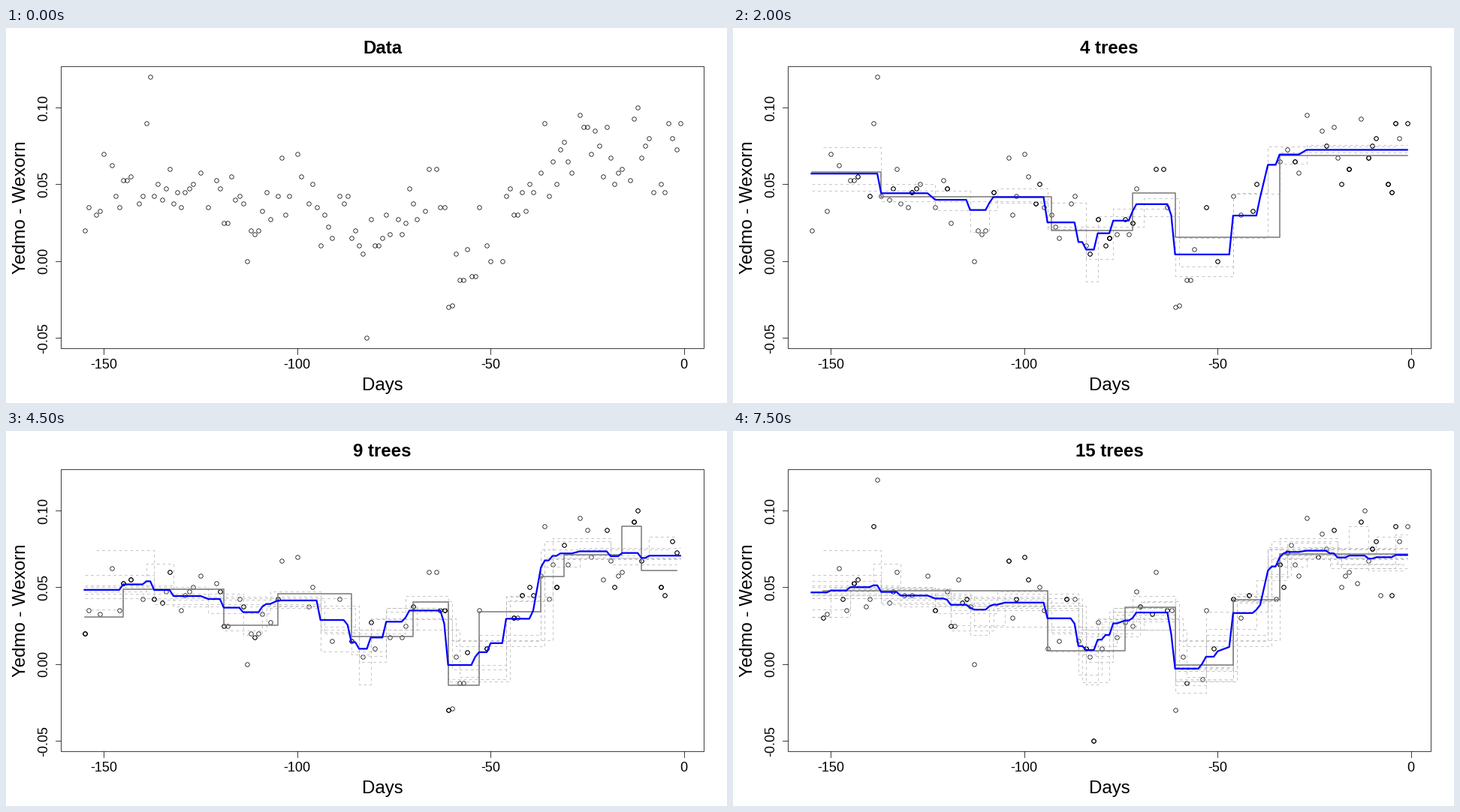
A matplotlib script for the animation above (8 s loop, 960 px wide and 500 px high).

```python
import matplotlib.pyplot as plt
import numpy as np
from matplotlib.animation import FuncAnimation
from matplotlib.patches import Rectangle

PT = 0.72   # points per pixel at 100 dpi
THIN = 0.75
TREES = 15
plt.rcParams["font.family"] = "Liberation Sans"

# Margins are in thousandths. Each phase: first day, mean, half-width of scatter.
PHASES = [(-155, 44, 25), (-142, 64, 12), (-135, 46, 24), (-120, 30, 26),
          (-109, 46, 27), (-98, 32, 22), (-86, 0, 10), (-81, 20, 11),
          (-71, 42, 18), (-61, -4, 14), (-49, 33, 20), (-40, 51, 7),
          (-36, 65, 22), (-28, 74, 22), (-10, 70, 22)]
# Polls that stand out.
KEY = {-155: 20, -150: 70, -139: 90, -138: 120, -113: 0, -100: 70, -82: -50,
       -66: 60, -61: -30, -60: -29, -53: 35, -47: 0, -36: 90, -27: 95,
       -12: 100, -8: 45, -4: 90, -1: 90}


def make_polls(seed):
    """Scatter polls around each phase mean, with some days left empty."""
    rng = np.random.default_rng(seed)
    polls = dict(KEY)
    ends = [p[0] for p in PHASES[1:]] + [0]
    for (start, mean, spread), end in zip(PHASES, ends):
        days = [d for d in range(start, end) if d in KEY or rng.random() < 0.85]
        free = [d for d in days if d not in KEY]
        fixed = sum(KEY[d] for d in days if d in KEY)
        noise = rng.uniform(-spread, spread, len(free))
        centre = (mean * len(days) - fixed) / max(len(free), 1)
        values = centre + noise - noise.mean()
        polls.update(zip(free, np.round(values / 2.5) * 2.5))
    days = sorted(polls)
    return np.array(days), np.array([polls[d] for d in days])


def deviance(y):
    return ((y - y.mean()) ** 2).sum()


def grow(x, y, min_gain):
    """Regression tree as a list of leaves: first day, last day, mean."""
    n = len(x)
    cuts = [i for i in range(7, n - 6) if x[i] > x[i - 1]]
    if n >= 20 and cuts:
        cost, i = min((deviance(y[:i]) + deviance(y[i:]), i) for i in cuts)
        if deviance(y) - cost >= min_gain:
            return grow(x[:i], y[:i], min_gain) + grow(x[i:], y[i:], min_gain)
    return [(x[0], x[-1], y.mean())]


def predict(leaves):
    """Tree at every poll day; cuts lie midway between sampled days."""
    cuts = [(a[1] + b[0]) / 2 for a, b in zip(leaves, leaves[1:])]
    means = np.array([leaf[2] for leaf in leaves])
    return means[np.searchsorted(cuts, DAYS, side="right")]


def px(day):
    return 903.3 + 5.15 * np.asarray(day)


def py(level):
    return 310.3 - 2.047 * np.asarray(level)


DAYS, MARGIN = make_polls(8)
samples = [np.sort(np.random.default_rng(n).integers(0, len(DAYS), len(DAYS)))
           for n in range(1, TREES + 1)]
forest = [grow(DAYS[s], MARGIN[s], 0.01 * deviance(MARGIN[s])) for s in samples]
means = np.cumsum([predict(t) for t in forest], axis=0)
means /= np.arange(1, TREES + 1)[:, None]

fig = plt.figure(figsize=(9.6, 5), dpi=100)
ax = fig.add_axes([0, 0, 1, 1])
# Half-pixel offset, so that snapped strokes land on the intended pixels.
ax.set(xlim=(0.5, 960.5), ylim=(499.5, -0.5))
ax.axis("off")


def line(x, y, color="black", width=THIN, **kw):
    return ax.plot(x, y, color=color, lw=width * PT, **kw)[0]


def label(x, y, s, size, **kw):
    return ax.text(x, y, s, fontsize=size * PT, ha="center", va="baseline",
                   rotation_mode="anchor", **kw)


def stairs(leaves, color, width, **kw):
    xs = [leaf[0] for leaf in leaves] + [leaves[-1][1]]
    ys = [leaf[2] for leaf in leaves] + [leaves[-1][2]]
    return line(px(xs), py(ys), color, width, drawstyle="steps-post", **kw)


back = ax.add_patch(Rectangle((-1, -1), 963, 503, fc="white", ec="none", zorder=0))
ax.add_patch(Rectangle((73.5, 50.5), 856, 376, fill=False, ec="black", lw=THIN * PT))
for d in range(-150, 1, 50):
    line([px(d)] * 2, [426.5, 434])
    label(px(d), 453, f"{d}", 18)
for v in range(-50, 101, 50):
    line([66, 73.5], [py(v)] * 2)
    label(56, py(v), f"{v / 1000:.2f}", 18, rotation=90)
label(501.5, 482, "Days", 24)
label(27, 239, "Yedmo - Wexorn", 24, rotation=90)
title = label(501.5, 34, "", 24, weight="bold")

dots = line([], [], ls="none", marker="o", ms=5.5 * PT, mfc="none",
            mec="black", mew=THIN * PT, zorder=2)
past = [stairs(t, "#b4b4b4", THIN, ls=(0, (5, 5)), zorder=3) for t in forest]
newest = [stairs(t, "#777777", 1.5, zorder=4) for t in forest]
fit = line([], [], "blue", 2.25, zorder=5)


def draw(n):
    grey = n == 1
    back.set_facecolor("#d1d1d1" if grey else "white")
    fit.set_color("#505050" if grey else "blue")
    newest[0].set(color="#303030", linewidth=THIN * PT)
    title.set_text(f"{n} tree{'s' if n > 1 else ''}" if n else "Data")

    shown = samples[n - 1] if n else np.arange(len(DAYS))
    dots.set_data(px(DAYS[shown]), py(MARGIN[shown]))
    for k in range(TREES):
        past[k].set_visible(k < n - 1)
        newest[k].set_visible(k == n - 1)
    fit.set_visible(n > 0)
    fit.set_data(px(DAYS), py(means[n - 1]))
    return []


anim = FuncAnimation(fig, draw, frames=TREES + 1, interval=500, repeat=True,
                     repeat_delay=0)
plt.show()
```
